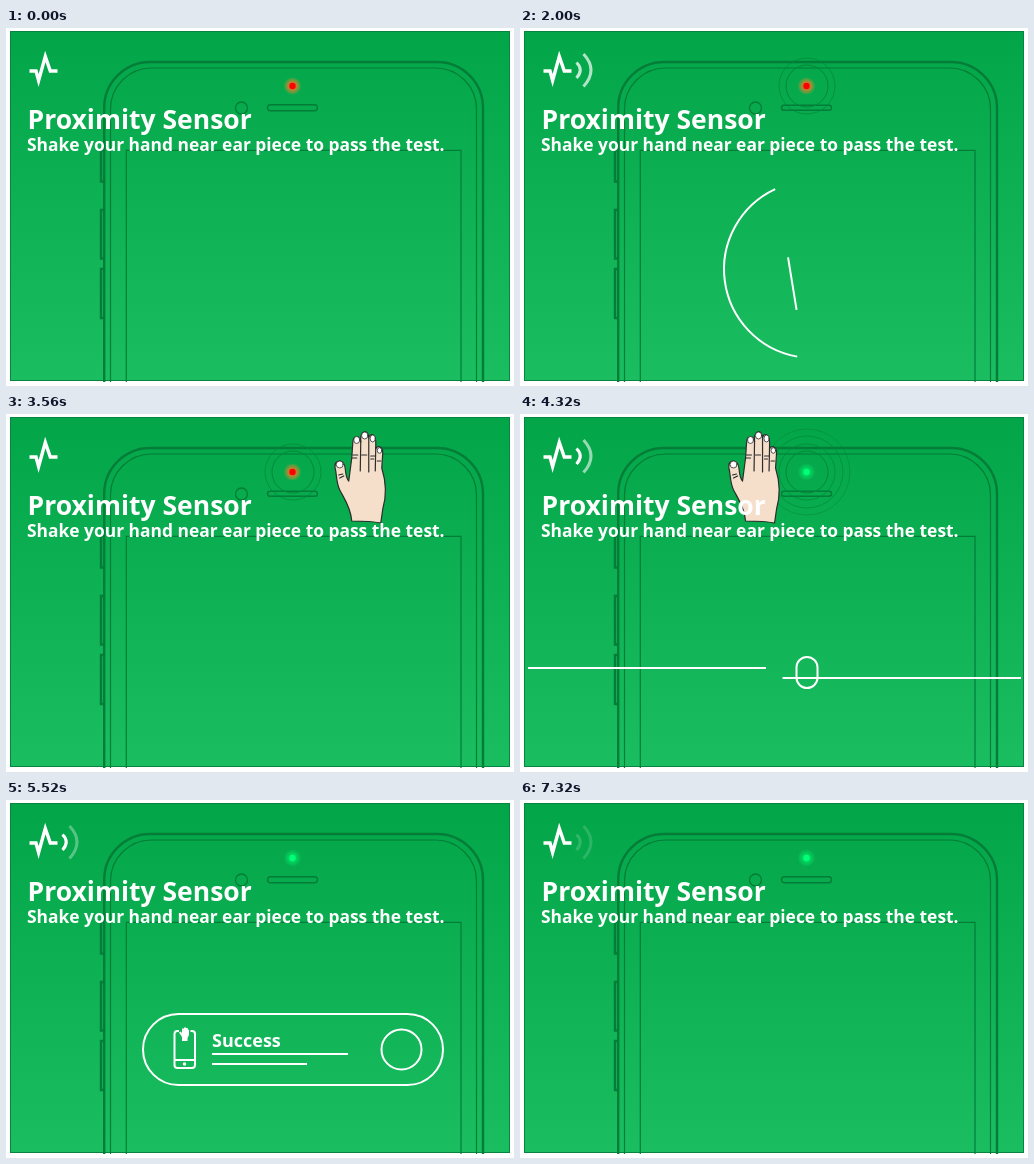
Animation, 508 px wide and 358 px high, one loop 7.36 s. Source, as an HTML page:

```html
<!DOCTYPE html>
<html lang="en">
<head>
<meta charset="utf-8">
<title>Proximity Sensor</title>
<style>
  html, body { margin: 0; width: 100%; height: 100%; overflow: hidden; background: #fff; }
  svg { display: block; width: 508px; height: 358px; }
  text { font-family: "Noto Sans", "Open Sans", sans-serif; font-weight: 600; fill: #fff; }
  .line { fill: none; stroke: #fff; stroke-width: 2; }
  .body { fill: none; stroke: #037d37; }
  .ring { fill: none; stroke: #04883a; stroke-width: 1; }
</style>
</head>
<body>
<svg viewBox="0 0 508 358">
  <defs>
    <linearGradient id="bg" x1="0" y1="0" x2="0" y2="1">
      <stop offset="0" stop-color="#02a548"/>
      <stop offset="1" stop-color="#1abe61"/>
    </linearGradient>
    <radialGradient id="redGlow">
      <stop offset=".35" stop-color="#ff6a24" stop-opacity=".85"/>
      <stop offset="1" stop-color="#ff9a2e" stop-opacity="0"/>
    </radialGradient>
    <radialGradient id="greenGlow">
      <stop offset=".3" stop-color="#00ff70" stop-opacity=".6"/>
      <stop offset="1" stop-color="#00ff70" stop-opacity="0"/>
    </radialGradient>
    <clipPath id="stage"><rect x="4" y="3" width="500" height="351"/></clipPath>
  </defs>
  <rect x="4.5" y="3.5" width="499" height="349" fill="url(#bg)" stroke="#07843d"/>

  <g clip-path="url(#stage)">
    <g class="body">
      <path stroke-width="2.4" d="M98.2 360V80a46 46 0 0 1 46-46H431a46 46 0 0 1 46 46V360"/>
      <path stroke-width="1.2" d="M104.5 360V81a41 41 0 0 1 41-41H429.500a41 41 0 0 1 41 41V360"/>
      <path stroke-width="1.2" d="M120.300 360V122.300H455V360"/>
      <path stroke-width="2.4" d="M98 122H95V153.500H98M98 182H95V230.500H98M98 241H95V290H98"/>
      <circle cx="235.500" cy="80" r="6" stroke-width="1.3"/>
      <rect id="ear" x="261.500" width="50" stroke-width="1.4"/>
    </g>

    <g id="rings"></g>
    <g id="red">
      <circle cx="286.500" cy="58" r="9" fill="url(#redGlow)"/>
      <circle cx="286.500" cy="58" r="3.200" fill="#f00"/>
    </g>
    <g id="green">
      <circle cx="286.500" cy="58" r="9" fill="url(#greenGlow)"/>
      <circle cx="286.500" cy="58" r="3.200" fill="#00ff78"/>
    </g>

    <g id="hand" stroke="#2c2c2c" stroke-width="1.2" stroke-linejoin="round" stroke-linecap="round">
      <path fill="#f5dfcb" d="M345 107C344 93 337 84 333 76C330 70 330 64 329 57C327 50 329 47 333 47C337 47 338 50 338.500 55C339 61 340 65 342 67L345 44L346 29C346 21 354 21 354 28C353 15 362 15 362 24C363 18 369 20 369 28V35C370 31 376 32 376 39L375 54C380 70 379 85 376 95L374 109C364 107 355 107 345 107Z"/>
      <path fill="none" d="M354 27L353.500 57M362 24V58M369 33L368.500 57M346 41H351M355 41H360M364 42H368M370.500 47H374M345.500 44H350M364 45H367M332 61L336 60M333 64L337 62"/>
      <g fill="#fff" stroke-width=".8">
        <ellipse cx="333" cy="50.500" rx="3.500" ry="3.500"/>
        <ellipse cx="350" cy="26" rx="3" ry="3.500"/>
        <ellipse cx="358" cy="21.500" rx="3.200" ry="3.500"/>
        <ellipse cx="366" cy="24.500" rx="2.600" ry="3.500"/>
        <ellipse cx="372.800" cy="36.500" rx="2.300" ry="2.800"/>
      </g>
    </g>

    <g id="spinner" class="line">
      <path id="arc"/>
      <path id="needle"/>
    </g>

    <g id="card">
      <rect id="pill" class="line"/>
      <path id="rows" class="line"/>
      <circle id="badge" class="line"/>
      <g id="info">
        <text x="206" y="247" font-size="18">Success</text>
        <path class="line" d="M173 231H171.500a3 3 0 0 0-3 3V265a3 3 0 0 0 3 3H186a3 3 0 0 0 3-3V234a3 3 0 0 0-3-3H184.500M168.500 260H189"/>
        <circle cx="178.500" cy="264" r="1.700" fill="#fff"/>
        <path fill="#fff" d="M176 241V237L173 232.500L174.500 231.500L176 233V228.500H178V227.500H180V228H181.800V229.500L183 230V235L181.500 238V241Z"/>
      </g>
    </g>

    <path d="M23.500 43H30L32.600 52.500L39.300 28.500L44.300 43H51.500" fill="none" stroke="#fff" stroke-width="3.400" stroke-miterlimit="10"/>
    <g fill="none" stroke="#fff" stroke-width="3">
      <path id="wave1" d="M56.500 34.500Q64 42 56.500 50"/>
      <path id="wave2" d="M63.500 26Q78.500 42 63.500 58.500"/>
    </g>
    <text x="21.500" y="101" font-size="26.500">Proximity Sensor</text>
    <text x="21" y="123" font-size="17.400">Shake your hand near ear piece to pass the test.</text>
  </g>
</svg>
<script>
const LOOP = 7360, WAVE = 1280, TURN = 720;
const $ = id => document.getElementById(id);
const set = (el, attrs) => { for (const k in attrs) el.setAttribute(k, attrs[k]); };
const fade = (el, v) => el.setAttribute('opacity', v);
const smooth = p => p * p * (3 - 2 * p);
const linear = p => p;

// Value at time t on a track of [time, value] steps.
function track(t, steps, ease = linear) {
  if (t <= steps[0][0]) return steps[0][1];
  for (let i = 1; i < steps.length; i++) {
    const [t0, a] = steps[i - 1], [t1, b] = steps[i];
    if (t < t1) return a + (b - a) * ease((t - t0) / (t1 - t0));
  }
  return steps[steps.length - 1][1];
}

const rings = [21, 28, 36, 43].map(r => {
  const c = document.createElementNS('http://www.w3.org/2000/svg', 'circle');
  set(c, { class: 'ring', cx: 287, cy: 58, r });
  $('rings').append(c);
  return c;
});
const ringFades = [
  [[300, 0], [600, 1], [4900, 1], [5300, 0]],
  [[500, 0], [800, .7], [4500, .7], [4900, 0]],
  [[3900, 0], [4200, .7], [4450, .7], [4800, 0]],
  [[4000, 0], [4300, .5], [4400, .5], [4700, 0]]
];

function drawWaves(t) {
  const p = t % WAVE;
  fade($('wave1'), track(p, [[120, 0], [400, 1], [640, 1], [980, 0]]));
  fade($('wave2'), track(p, [[300, 0], [580, .9], [640, .9], [980, 0]]));
}

function drawSpinner(t) {
  const on = t > 0 && t < 3060;
  fade($('spinner'), on ? 1 : 0);
  if (!on) return;
  const grow = track(t, [[0, 0], [500, 1], [2600, 1], [3060, 0]], smooth);
  const point = deg => {
    const a = deg * Math.PI / 180;
    return `${292.7 + 88.6 * Math.cos(a)} ${241.3 + 88.6 * Math.sin(a)}`;
  };
  set($('arc'), { d: `M${point(244.5 - 145 * grow)}A88.600 88.600 0 0 1 ${point(244.5)}` });
  set($('needle'), { d: `M268 229.500L${268 + 9 * grow} ${229.5 + 52.5 * grow}` });
  set($('spinner'), { transform: `rotate(${(t - 2000) / TURN * 360} 286 234.500)` });
}

function drawHand(t) {
  const x = track(t, [[3200, 26], [4700, -147]], smooth);
  set($('hand'), { transform: `translate(${x} 0)` });
  fade($('hand'), track(t, [[3080, 0], [3280, 1], [4500, 1], [4700, 0]]));
}

function drawCard(t) {
  fade($('card'), track(t, [[6700, 1], [7240, 0]]));
  const w = track(t, [[3780, 0], [4080, 21], [4340, 21], [4760, 350], [5000, 333], [5360, 304], [5520, 300]], smooth);
  const h = track(t, [[3780, 0], [4080, 31], [4340, 31], [5000, 44], [5360, 71]], smooth);
  const y = track(t, [[4320, 258.5], [5000, 255.2], [5360, 249.5]], smooth);
  set($('pill'), { x: 287 - w / 2, y: y - h / 2, width: w, height: h, rx: Math.min(w, h) / 2 });
  fade($('pill'), t > 3780 ? 1 : 0);

  const p = track(t, [[4320, 0], [4920, 1]], smooth);
  const mix = (a, b) => a + (b - a) * p;
  set($('rows'), { d: `M${mix(8, 206)} 254H${mix(246, 342)}M${mix(262.5, 206)} 264H${mix(501, 301)}` });
  fade($('rows'), track(t, [[4160, 0], [4300, 1]]));

  set($('badge'), {
    cx: track(t, [[5000, 408.5], [5400, 395.5]], smooth),
    cy: track(t, [[5000, 248], [5400, 249.5]], smooth),
    r: track(t, [[4800, 0], [5000, 10.2], [5400, 20]])
  });
  fade($('badge'), t > 4800 ? 1 : 0);
  fade($('info'), track(t, [[5120, 0], [5480, 1]]));
}

function draw(t) {
  drawWaves(t);
  drawSpinner(t);
  drawHand(t);
  drawCard(t);
  rings.forEach((c, i) => fade(c, track(t, ringFades[i])));
  const near = t >= 4000;
  fade($('red'), near ? 0 : 1);
  fade($('green'), near ? 1 : 0);
  const active = t >= 400 && t < 5300;
  set($('ear'), active ? { y: 77.2, height: 5, rx: 2.5 } : { y: 76.7, height: 6, rx: 3 });
}

function loop() {
  draw(performance.now() % LOOP);
  requestAnimationFrame(loop);
}
loop();
</script>
</body>
</html>
```
